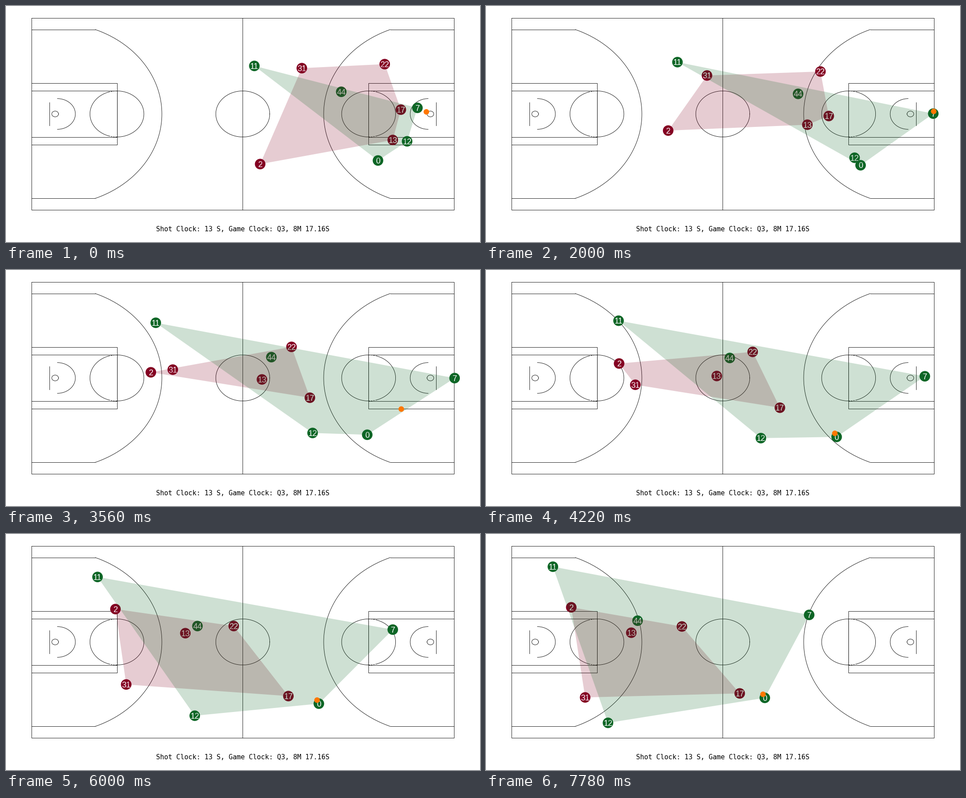
These frames come from a looping animation (1058 px wide and 529 px high, 8 s). A matplotlib script:

```python
import numpy as np
import matplotlib.pyplot as plt
from matplotlib.animation import FuncAnimation
from matplotlib.patches import Circle, Polygon

W, H, DPI = 1058, 529, 100
LOOP, TICK, STEPS = 8000, 40, 36
PT = 72 / DPI                      # points per pixel
RED, GREEN, ORANGE = "#840022", "#0e6626", "#ff7700"

# Court geometry: 94 x 50 ft stretched onto the stage
LEFT, TOP, RIGHT, BOTTOM = 57, 27, 1000, 457
FX, FY = (RIGHT - LEFT) / 94, (BOTTOM - TOP) / 50
MID_X, MID_Y = (LEFT + RIGHT) / 2, (TOP + BOTTOM) / 2

# Each run is a smooth curve through five places at these steps
KEYS = (0, 6, 16, 27, 35)
REDS = {
    "31": [(660, 139), (552, 138), (372, 223), (268, 337), (221, 366)],
    "22": [(845, 130), (790, 138), (637, 172), (508, 206), (437, 207)],
    "17": [(881, 232), (810, 237), (678, 286), (630, 363), (566, 357)],
    "13": [(863, 300), (777, 276), (571, 245), (400, 222), (324, 221)],
    "2": [(567, 354), (453, 302), (323, 229), (244, 168), (190, 164)],
}
GREENS = {
    "11": [(554, 134), (468, 128), (334, 118), (204, 96), (149, 73)],
    "44": [(748, 192), (729, 198), (592, 195), (427, 206), (338, 194)],
    "7": [(918, 228), (977, 237), (1001, 242), (863, 214), (721, 181)],
    "12": [(895, 303), (863, 329), (684, 365), (421, 407), (272, 423)],
    "0": [(830, 346), (838, 352), (806, 369), (698, 380), (622, 367)],
}


def run(places):
    """Quartic through the places, sampled at every step."""
    coef = np.polyfit(KEYS, np.array(places, float), len(KEYS) - 1)
    return np.vander(np.arange(STEPS), len(KEYS)) @ coef + 0.3


def progress(start, end):
    return np.clip((np.arange(STEPS) - start) / (end - start), 0, 1)[:, None]


def mix(a, b, u):
    return np.array(a) * (1 - u) + np.array(b) * u


def hull(points):
    """Convex hull by monotone chain."""
    pts = sorted(map(tuple, points))

    def chain(seq):
        out = []
        for c in seq:
            while len(out) > 1:
                a, b = out[-2:]
                if (b[0] - a[0]) * (c[1] - a[1]) > (b[1] - a[1]) * (c[0] - a[0]):
                    break
                out.pop()
            out.append(c)
        return out[:-1]

    return chain(pts) + chain(pts[::-1])


fig = plt.figure(figsize=(W / DPI, H / DPI), dpi=DPI, facecolor="white")
ax = fig.add_axes([0, 0, 1, 1])
ax.set_xlim(0, W)
ax.set_ylim(H, 0)
ax.axis("off")


def line(xs, ys, **style):
    ax.plot(xs, ys, color="black", lw=0.85 * PT, zorder=1, **style)


def arc(cx, cy, rx, ry, start=0, end=360, flip=False, **style):
    a = np.radians(np.linspace(start, end, 181))
    xs = cx + rx * np.cos(a)
    line(2 * MID_X - xs if flip else xs, cy + ry * np.sin(a), **style)


def half_court(flip):
    def seg(xs, ys):
        xs = np.array(xs)
        line(2 * MID_X - xs if flip else xs, ys)

    hoop, foul = LEFT + 5.25 * FX, LEFT + 19 * FX
    for half in (8, 6):
        seg([LEFT, foul, foul, LEFT],
            [MID_Y - half * FY] * 2 + [MID_Y + half * FY] * 2)
    board = LEFT + 4 * FX
    seg([board, board], [MID_Y - 3 * FY, MID_Y + 3 * FY])
    arc(hoop, MID_Y, 0.75 * FX, 0.75 * FY, flip=flip)
    arc(hoop + 0.5 * FX, MID_Y, 4 * FX, 4 * FY, -90, 90, flip)

    # Foul circle, dashed where its inner half meets the line
    rx, ry = 6 * FX, 6 * FY
    arc(foul, MID_Y, rx, ry, -90, 90, flip)
    arc(foul, MID_Y, rx, ry, 108, 252, flip)
    for start, end in ((90, 108), (252, 270)):
        arc(foul, MID_Y, rx, ry, start, end, flip, dashes=(4, 2))

    # Three-point line
    rx, ry, corner = 23.75 * FX, 23.75 * FY, 22 * FY
    edge = np.degrees(np.arcsin(corner / ry))
    end_x = hoop + rx * np.cos(np.radians(edge))
    arc(hoop, MID_Y, rx, ry, -edge, edge, flip)
    for y in (MID_Y - corner, MID_Y + corner):
        seg([LEFT, end_x], [y, y])


line([LEFT, RIGHT, RIGHT, LEFT, LEFT], [TOP, TOP, BOTTOM, BOTTOM, TOP])
line([MID_X - 0.4] * 2, [TOP, BOTTOM])
arc(MID_X, MID_Y, 6 * FX, 6 * FY)
half_court(False)
half_court(True)

ax.text(MID_X, 505, "Shot Clock: 13 S, Game Clock: Q3, 8M 17.16S",
        family="DejaVu Sans Mono", size=15 * PT, ha="center", va="baseline")


class Team:
    def __init__(self, players, color, z):
        self.runs = {name: run(places) for name, places in players.items()}
        self.dots = [ax.add_patch(Circle((0, 0), 11.8, fc=color, lw=0, zorder=2))
                     for _ in players]
        self.labels = [ax.text(0, 0, name, color="white", size=18 * PT,
                               family="Liberation Sans", ha="center",
                               va="baseline", zorder=3) for name in players]
        self.area = ax.add_patch(Polygon([(0, 0)] * 3, fc=color, alpha=0.2,
                                         lw=0, zorder=z))

    def move(self, step):
        spots = [r[step] for r in self.runs.values()]
        for (x, y), dot, label in zip(spots, self.dots, self.labels):
            dot.center = x, y
            label.set_position((x, y + 6.5))
        self.area.set_xy(hull(spots))


reds, greens = Team(REDS, RED, 4), Team(GREENS, GREEN, 5)

# The ball drops from the rim to 7, who carries it and then passes to 0
held = greens.runs["7"] + mix((20, 9), (1, -5), progress(0, 5))
ball_run = mix(held, greens.runs["0"] + (-4, -8), progress(13, 18))
ball = ax.add_patch(Circle((0, 0), 6.2, fc=ORANGE, lw=0, zorder=6))


def update(tick):
    step = min(int((tick + 1) * TICK * STEPS / LOOP), STEPS - 1)
    reds.move(step)
    greens.move(step)
    ball.center = tuple(ball_run[step])
    return []


anim = FuncAnimation(fig, update, frames=LOOP // TICK, interval=TICK,
                     repeat=True, repeat_delay=0, blit=False)
plt.show()
```
